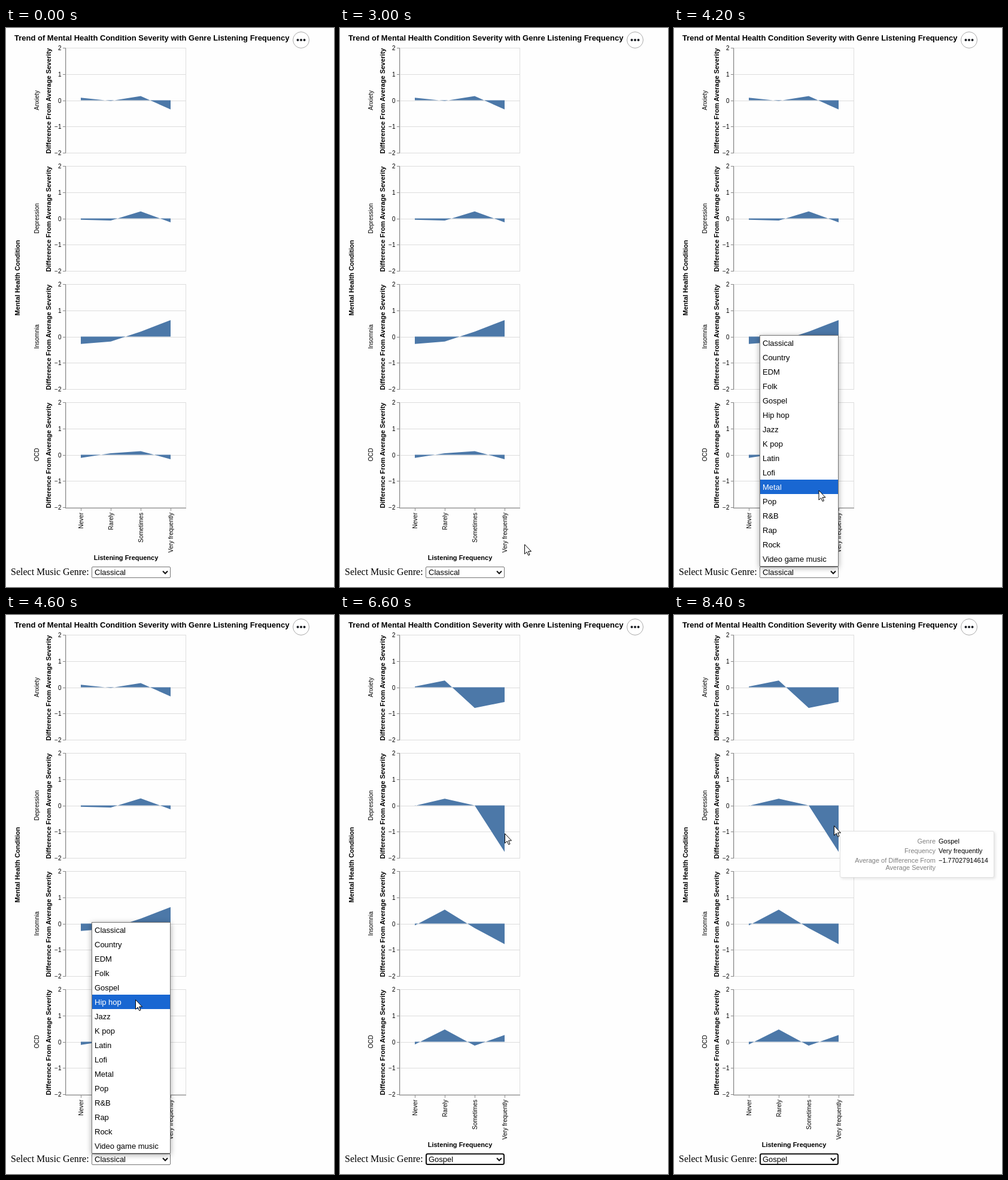
Write an HTML page that moves like this. It is 548x932 px and loops after 8.6 s.

```html
<!DOCTYPE html>
<html lang="en">
<head>
<meta charset="utf-8">
<title>Genre trend</title>
<style>
html, body { margin: 0; width: 100%; height: 100%; overflow: hidden; background: #fefefe; }
svg { display: block; font-family: "Liberation Sans", Arial, sans-serif; }
.tip { filter: drop-shadow(2px 2px 2px rgba(0,0,0,.1)); }
.popup { filter: drop-shadow(0 2px 5px rgba(0,0,0,.35)); }
</style>
</head>
<body>
<svg id="stage" width="548" height="932" viewBox="0 0 548 932"></svg>
<script>
const LOOP = 8600, STEP = 200, OPEN = 3400, PICK = 5200, TIP = 6800;
const LEFT = 100, TOP = 33, WIDTH = 200, HEIGHT = 175, PITCH = 197, UNIT = HEIGHT / 4, BAND = WIDTH / 4;
const LIST_TOP = 513, ITEM = 24;
const rows = ['Anxiety', 'Depression', 'Insomnia', 'OCD'];
const levels = ['Never', 'Rarely', 'Sometimes', 'Very frequently'];
const genres = ['Classical', 'Country', 'EDM', 'Folk', 'Gospel', 'Hip hop', 'Jazz', 'K pop',
  'Latin', 'Lofi', 'Metal', 'Pop', 'R&amp;B', 'Rap', 'Rock', 'Video game music'];
// Charted values: one list per condition, one value per listening level
const data = {
  Classical: [[.1, -.02, .16, -.35], [-.05, -.08, .27, -.15], [-.28, -.19, .19, .63], [-.12, .06, .14, -.17]],
  Gospel: [[.03, .26, -.79, -.56], [-.01, .26, 0, -1.77], [-.07, .53, -.17, -.78], [-.1, .47, -.15, .26]]
};
// Pointer stops: enter, reach the select, pick an item, swing round to the tooltip
const stops = [
  { t: 1600, x: 525, y: 672 }, { t: 1800, x: 497, y: 700 }, { t: 2600, x: 349, y: 821 },
  { t: OPEN, x: 267, y: 900 }, { t: 3800, x: 267, y: 900 }, { t: 4600, x: 216, y: 641 },
  { t: PICK, x: 213, y: 624 }, { t: 6000, x: 316, y: 405 }, { t: 6600, x: 275, y: 364 },
  { t: TIP, x: 267, y: 351 }
];

const text = (x, y, s, size, extra = '') => `<text x="${x}" y="${y}" font-size="${size}" ${extra}>${s}</text>`;
const side = (x, y, s, size, anchor, extra = '') =>
  text(0, 0, s, size, `transform="translate(${x} ${y}) rotate(-90)" text-anchor="${anchor}" ${extra}`);
const line = (x1, y1, x2, y2, color) =>
  `<path d="M${x1} ${y1}L${x2} ${y2}" stroke="${color}" fill="none"/>`;
const rect = (x, y, w, h, fill, extra = '') =>
  `<rect x="${x}" y="${y}" width="${w}" height="${h}" fill="${fill}" ${extra}/>`;
const bold = 'font-weight="bold"', mid = 'text-anchor="middle"', end = 'text-anchor="end"';

function panel(name, i) {
  const top = TOP + PITCH * i + .5, right = LEFT + WIDTH;
  let s = rect(LEFT + .5, top, WIDTH, HEIGHT, 'none', 'stroke="#ddd"');
  for (let v = 2; v >= -2; v--) {
    const y = top + Math.round((2 - v) * UNIT);
    s += line(LEFT, y, right, y, '#ddd') + line(LEFT - 5, y, LEFT, y, '#888') +
      text(92.5, y + 3.5, v < 0 ? '\u2212' + -v : v, 10, end);
  }
  return s + line(LEFT - .5, top - .5, LEFT - .5, top + HEIGHT + .5, '#888') +
    side(54.5, top + 87, name, 10, 'middle') +
    side(75, top + 88, 'Difference From Average Severity', 11, 'middle', bold);
}

function level(name, i) {
  const x = LEFT + BAND * (i + .5) + .5;
  return line(x, 800, x, 805, '#888') + side(x + 3.5, 808, name, 10, 'end');
}

function frame() {
  const dots = [-5.5, 0, 5.5].map(d => `<circle cx="${493 + d}" cy="20" r="2" fill="#1b1e23"/>`);
  return text(243.7, 21, 'Trend of Mental Health Condition Severity with Genre Listening Frequency', 13, `${bold} ${mid}`) +
    side(23, 416.5, 'Mental Health Condition', 11, 'middle', bold) +
    rows.map(panel).join('') + line(LEFT - 1, 800.5, LEFT + WIDTH + 1, 800.5, '#888') + levels.map(level).join('') +
    text(200.5, 887, 'Listening Frequency', 11, `${bold} ${mid}`) +
    '<circle cx="493" cy="20" r="13.5" fill="#fff" stroke="#aaa"/>' + dots.join('') +
    text(8, 912, 'Select Music Genre:', 16, `font-family="'Liberation Serif', 'Times New Roman', serif"`);
}

function area(values, i) {
  const zero = TOP + PITCH * i + HEIGHT / 2, x = k => LEFT + BAND * (k + .5);
  const pts = values.map((v, k) => `${x(k)} ${(zero - v * UNIT).toFixed(2)}`);
  return `<path d="M${x(0)} ${zero}L${pts.join('L')}L${x(3)} ${zero}Z" fill="#4c78a8"/>`;
}

function select(genre, focused) {
  const box = focused
    ? rect(144, 898.5, 130, 17.5, '#fff', 'rx="2.5" stroke="#101010" stroke-width="2"')
    : rect(143.5, 898.5, 131, 18, '#fff', 'rx="1.5" stroke="#767676"');
  return box + text(148, 912, genre, 13) +
    '<path d="M262 905.5l4 4l4 -4" fill="none" stroke="#111" stroke-width="2"/>';
}

function popup(active) {
  const items = genres.map((name, i) => {
    const y = LIST_TOP + ITEM * i, on = i === active;
    return (on ? rect(144, y, 130, ITEM, '#1967d2') : '') + text(148, y + 17, name, 13, on ? 'fill="#fff"' : '');
  });
  return rect(143.5, LIST_TOP - .5, 131, ITEM * genres.length + 1, '#fff', 'class="popup" stroke="#767676"') + items.join('');
}

function tooltip() {
  const key = (y, s) => text(437, y, s, 11, `${end} fill="#808080"`);
  const value = (y, s) => text(442, y, s, 11);
  return rect(277.5, 360.5, 257, 77, '#fff', 'class="tip" rx="2.5" stroke="#e0e0e0"') +
    key(381, 'Genre') + value(381, 'Gospel') +
    key(397, 'Frequency') + value(397, 'Very frequently') +
    key(413, 'Average of Difference From') + value(413, '\u22121.77027914614') +
    key(425, 'Average Severity');
}

function pointerAt(t) {
  const i = stops.findIndex(p => p.t > t);
  if (i === 0) return null;
  if (i < 0) return stops[stops.length - 1];
  const a = stops[i - 1], b = stops[i], k = (t - a.t) / (b.t - a.t);
  return { x: a.x + (b.x - a.x) * k, y: a.y + (b.y - a.y) * k };
}

const pointer = ({ x, y }) => `<path transform="translate(${x} ${y})"
  d="M.5 .5V16.5L4.2 13L6.7 18.7L9 17.7L6.6 12.1H11.5Z" fill="#fff" stroke="#000"/>`;

function scene(t) {
  const picked = t >= PICK, genre = picked ? 'Gospel' : 'Classical', at = pointerAt(t);
  let s = data[genre].map(area).join('') + select(genre, picked);
  if (t >= OPEN && !picked) {
    const item = Math.floor((at.y - LIST_TOP) / ITEM);
    s += popup(item < genres.length ? item : 0);
  }
  if (t >= TIP) s += tooltip();
  return at ? s + pointer(at) : s;
}

const stage = document.getElementById('stage');
stage.innerHTML = frame() + '<g id="live"></g>';
const live = document.getElementById('live');
const start = performance.now();
let shown = -1;

function draw() {
  const t = Math.floor((performance.now() - start) % LOOP / STEP) * STEP;
  if (t !== shown) live.innerHTML = scene(shown = t);
  requestAnimationFrame(draw);
}
draw();
</script>
</body>
</html>
```
